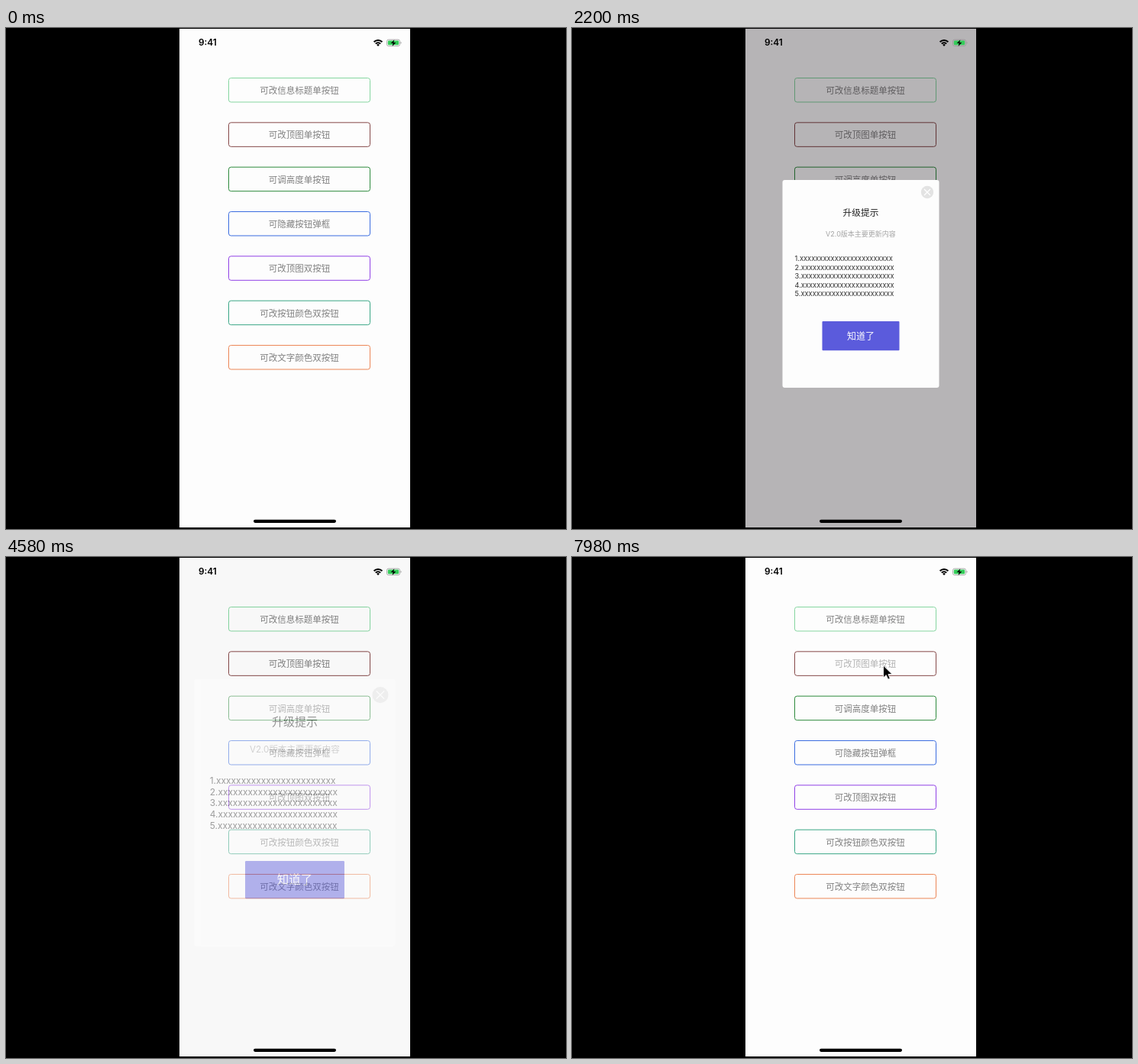
An HTML page that plays this animation: 733x656 px, repeating every 8 s.

```html
<!DOCTYPE html>
<html lang="zh-CN">
<head>
<meta charset="utf-8">
<title>弹框演示</title>
<style>
  html, body { margin: 0; width: 100%; height: 100%; overflow: hidden; background: #000; }
  svg { display: block; width: 100%; height: 100%; }
  text { font-family: Inter, "Noto Sans CJK SC", "Noto Sans CJK", sans-serif; }
</style>
</head>
<body>
<svg viewBox="0 0 733 656">
  <rect x="227" y="1" width="302" height="653" fill="#fdfdfd"/>
  <g id="menu"></g>
  <rect id="shade" x="227" y="1" width="302" height="653" fill="#0a000a"/>

  <g id="dialog">
    <rect x="275.5" y="199" width="205" height="272" rx="3" fill="#fdfdfd"/>
    <circle cx="465" cy="215" r="8.2" fill="#e3e3e3"/>
    <path d="M461 211l8 8m0-8l-8 8" stroke="#fff" stroke-width="1.1"/>
    <rect x="327.5" y="384" width="101" height="38.3" rx="1" fill="#5b5bdc"/>
  </g>

  <g id="status">
    <text x="252" y="23.3" font-size="11.8" font-weight="600">9:41</text>
    <g fill="none" stroke="#000" stroke-width="2">
      <path d="M481.6 18.2a7.6 7.6 0 0 1 10.8 0M483.8 20.6a4.5 4.5 0 0 1 6.4 0"/>
    </g>
    <path d="M487 24l-1.9-2a2.7 2.7 0 0 1 3.8 0z"/>
    <rect x="498.5" y="15.2" width="17" height="8.4" rx="2.2" fill="none" stroke="#999" stroke-width=".8"/>
    <rect x="499.8" y="16.5" width="14.4" height="5.8" rx="1.2" fill="#35cc5a"/>
    <path d="M516.6 18v2.8q1-.4 1-1.4t-1-1.4" fill="#999"/>
    <path d="M508.3 15.2l-4.6 4.8h2.9l-1 4 4.7-5h-3z"/>
    <rect x="324" y="643.7" width="108" height="4.2" rx="2.1"/>
  </g>

  <path id="cursor" d="M0 0V16L3.7 12.6L6.2 18.2L8.8 17L6.4 11.6H11.6Z" stroke="#fff" stroke-width=".9"/>
</svg>

<script>
const DURATION = 8000, STEP = 147.8;
const CENTER = { x: 378, y: 335 };
const $ = id => document.getElementById(id);

function add(parent, tag, attrs, label = '') {
  const node = document.createElementNS('http://www.w3.org/2000/svg', tag);
  for (const key in attrs) node.setAttribute(key, attrs[key]);
  node.textContent = label;
  return parent.appendChild(node);
}

function addLabel(parent, label, x, middle, size, fill, more = {}) {
  return add(parent, 'text', {
    x, y: middle + size * 0.38, 'font-size': size, fill, 'text-anchor': 'middle', ...more
  }, label);
}

const menuLabels = [
  ['可改信息标题单按钮', '#85d6a0'],
  ['可改顶图单按钮', '#854848'],
  ['可调高度单按钮', '#2d8a3c'],
  ['可隐藏按钮弹框', '#3a6ce0'],
  ['可改顶图双按钮', '#9040e6'],
  ['可改按钮颜色双按钮', '#38a685'],
  ['可改文字颜色双按钮', '#ec8656']
].map(([label, stroke], i) => {
  const y = 65.5 + i * 58.33;
  add($('menu'), 'rect', { x: 291.5, y, width: 185, height: 31.5, rx: 3, fill: 'none', stroke });
  return addLabel($('menu'), label, 384, y + 16, 11.5, '#808080');
});

const dialog = $('dialog');
addLabel(dialog, '升级提示', 378, 242, 11.7, '#222', { 'font-weight': 500 });
addLabel(dialog, 'V2.0版本主要更新内容', 378, 270, 9, '#a4a4a4');
for (let i = 1; i <= 5; i++) {
  addLabel(dialog, `${i}.${'x'.repeat(24)}`, 291.5, 290.2 + i * 11.55, 9.3, '#333', { 'text-anchor': 'start' });
}
const confirmLabel = addLabel(dialog, '知道了', 378, 403, 12, '#fff');

const clamp = v => Math.max(0, Math.min(1, v));
const progress = (t, from, to) => clamp((t - from) / (to - from));
const smooth = p => p * p * (3 - 2 * p);
const mix = (a, b, p) => a + (b - a) * p;
const between = (t, from, to) => t >= from && t < to;

// Pointer trips: visible from, hidden at, move start, move end, start point, end point
const trips = [
  [2480, 3820, 2480, 3540, [330, 306], [393, 386]],
  [4860, 6500, 4860, 5460, [622, 428], [399.5, 79]],
  [6500, DURATION, 6500, 7800, [399.5, 79], [407.5, 142]]
];

function drawCursor(t) {
  const trip = trips.find(([shown, hidden]) => between(t, shown, hidden));
  $('cursor').setAttribute('visibility', trip ? 'visible' : 'hidden');
  if (!trip) return;
  const [, , start, end, a, b] = trip;
  const p = smooth(progress(t, start, end));
  $('cursor').setAttribute('transform', `translate(${mix(a[0], b[0], p)} ${mix(a[1], b[1], p)})`);
}

function drawDialog(t) {
  const open = between(t, 1320, 4720);
  const leaving = Math.pow(progress(t, 4370, 4690), 1.35);
  const scale = 1 + 0.16 * Math.exp((1330 - t) / 80) + 0.5 * leaving;
  dialog.setAttribute('visibility', open ? 'visible' : 'hidden');
  dialog.setAttribute('opacity', 1 - leaving * 0.95);
  dialog.setAttribute('transform',
    `translate(${CENTER.x} ${CENTER.y}) scale(${open ? scale : 1}) translate(${-CENTER.x} ${-CENTER.y})`);
  $('shade').setAttribute('opacity', open ? 0.29 * (1 - progress(t, 4395, 4594)) : 0);
}

function draw(now) {
  // The screen refreshes in held steps rather than continuously
  const t = Math.floor((now % DURATION + 20) / STEP) * STEP;
  drawDialog(t);
  drawCursor(t);
  menuLabels[0].setAttribute('opacity', between(t, 1020, 1320) ? 0.6 : 1);
  menuLabels[1].setAttribute('opacity', t > 7800 ? 0.6 : 1);
  confirmLabel.setAttribute('opacity', between(t, 3820, 4500) ? 0.6 : 1);
  requestAnimationFrame(draw);
}
requestAnimationFrame(draw);
</script>
</body>
</html>
```
